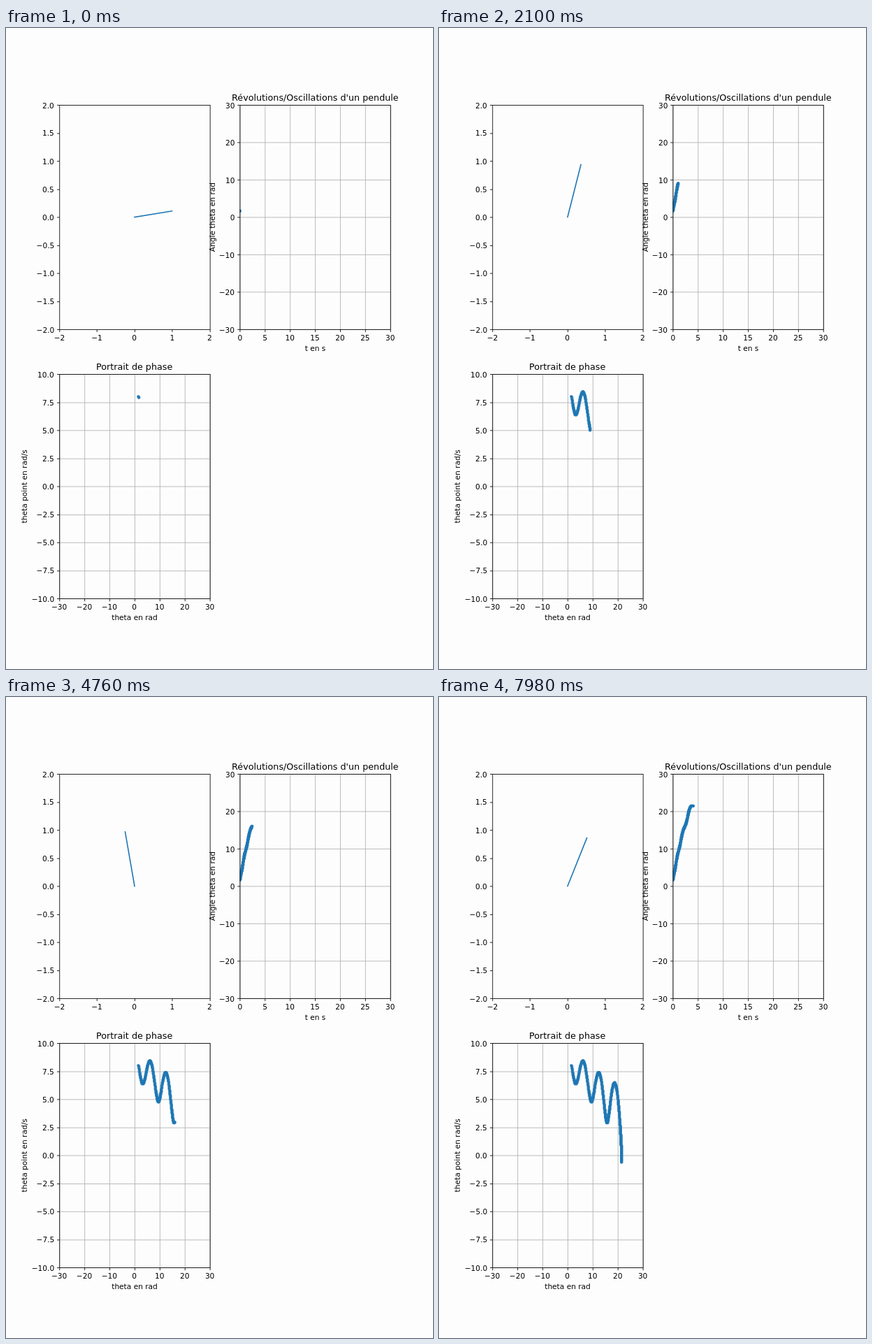
An HTML page with a canvas for the animation above (8 s loop, 611 by 917 pixels).

```html
<!DOCTYPE html>
<html lang="fr">
<head>
<meta charset="utf-8">
<title>Pendule amorti</title>
<style>
html, body { margin: 0; width: 100%; height: 100%; overflow: hidden; background: #fdfdfd; }
canvas { display: block; width: 611px; height: 917px; }
</style>
</head>
<body>
<canvas id="stage" width="611" height="917"></canvas>
<script>
// The figure is laid out on an 800 x 1200 sheet and scaled to the stage
const W = 800, H = 1200;
const LOOP = 8000, STEP = 20, DT = 0.01;
const GRAVITY = 9.81, DAMPING = 0.2;
const BLUE = '#1f77b4', INK = '#000', GRID = '#b0b0b0', PAPER = '#fdfdfd';
const FONT = '"DejaVu Sans", sans-serif';
const PT = 100 / 72;
const SMALL = 10 * PT, LARGE = 12 * PT;
const HAIR = 0.8 * PT, ROD = 1.5 * PT, DOT = 2 * PT;
const TICK = 3.5 * PT, GAP = 7 * PT, LABEL_GAP = 4 * PT, TITLE_GAP = 6 * PT;
const ASCENT = 11, DESCENT = 3;

const canvas = document.getElementById('stage');
const ctx = canvas.getContext('2d');
ctx.scale(canvas.width / W, canvas.height / H);
ctx.imageSmoothingQuality = 'high';

// Dots are stamped on a full-size layer so that overlapping edges build up
const layer = document.createElement('canvas');
layer.width = W;
layer.height = H;
const dots = layer.getContext('2d');

// Subplot geometry: a 2 x 2 grid with a 20 % gutter
const PLOT_W = W * 0.775 / 2.2, PLOT_H = H * 0.77 / 2.2;

function makePlot(col, row, options) {
  return {
    left: W * 0.125 + col * PLOT_W * 1.2,
    top: H * 0.12 + row * PLOT_H * 1.2,
    ...options
  };
}

const swing = makePlot(0, 0, {
  x: { min: -2, max: 2, step: 1, digits: 0 },
  y: { min: -2, max: 2, step: 0.5, digits: 1 }
});
const history = makePlot(1, 0, {
  x: { min: 0, max: 30, step: 5, digits: 0 },
  y: { min: -30, max: 30, step: 10, digits: 0 },
  grid: true,
  title: "Révolutions/Oscillations d'un pendule",
  xLabel: 't en s',
  yLabel: 'Angle theta en rad'
});
const phase = makePlot(0, 1, {
  x: { min: -30, max: 30, step: 10, digits: 0 },
  y: { min: -10, max: 10, step: 2.5, digits: 1 },
  grid: true,
  title: 'Portrait de phase',
  xLabel: 'theta en rad',
  yLabel: 'theta point en rad/s'
});
const plots = [swing, history, phase];

const toX = (p, v) => p.left + (v - p.x.min) / (p.x.max - p.x.min) * PLOT_W;
const toY = (p, v) => p.top + (p.y.max - v) / (p.y.max - p.y.min) * PLOT_H;
const nearest = v => Math.round(v + 1e-6);
const snap = v => nearest(v) + 0.5;

function ticks({ min, max, step }) {
  return Array.from({ length: Math.round((max - min) / step) + 1 }, (_, i) => min + i * step);
}

const format = (v, digits) => v.toFixed(digits).replace('-', '\u2212');

// Damped pendulum, integrated with fourth-order Runge-Kutta
const accel = (a, v) => -GRAVITY * Math.sin(a) - DAMPING * v;

function advance({ t, a, v }) {
  const h = DT / 2;
  const v1 = v, g1 = accel(a, v);
  const v2 = v + h * g1, g2 = accel(a + h * v1, v2);
  const v3 = v + h * g2, g3 = accel(a + h * v2, v3);
  const v4 = v + DT * g3, g4 = accel(a + DT * v3, v4);
  return {
    t: t + DT,
    a: a + DT / 6 * (v1 + 2 * v2 + 2 * v3 + v4),
    v: v + DT / 6 * (g1 + 2 * g2 + 2 * g3 + g4)
  };
}

const states = [{ t: 0, a: 1.6, v: 8 }];
while (states.length <= LOOP / STEP) states.push(advance(states[states.length - 1]));

function line(x1, y1, x2, y2) {
  ctx.beginPath();
  ctx.moveTo(x1, y1);
  ctx.lineTo(x2, y2);
  ctx.stroke();
}

function textWidth(str, size = SMALL) {
  ctx.font = `${size}px ${FONT}`;
  return ctx.measureText(str).width;
}

// anchor: 0.5 centres the text on x, 1 ends it there
function text(str, x, y, anchor, size = SMALL) {
  const width = textWidth(str, size);
  ctx.fillText(str, nearest(x - width * anchor), nearest(y));
}

function drawGrid(p) {
  ctx.strokeStyle = GRID;
  ctx.lineWidth = HAIR;
  for (const v of ticks(p.x)) line(snap(toX(p, v)), p.top, snap(toX(p, v)), p.top + PLOT_H);
  for (const v of ticks(p.y)) line(p.left, snap(toY(p, v)), p.left + PLOT_W, snap(toY(p, v)));
}

function drawAxes(p) {
  const bottom = p.top + PLOT_H;
  const centerX = p.left + PLOT_W / 2, centerY = p.top + PLOT_H / 2;
  const x0 = snap(p.left), y0 = snap(p.top);
  const x1 = snap(p.left + PLOT_W), y1 = snap(bottom);
  ctx.strokeStyle = ctx.fillStyle = INK;
  ctx.lineWidth = HAIR;
  ctx.strokeRect(x0, y0, x1 - x0, y1 - y0);

  const tickBase = bottom + GAP + ASCENT;
  for (const v of ticks(p.x)) {
    const x = toX(p, v);
    line(snap(x), y1, snap(x), y1 + TICK);
    text(format(v, p.x.digits), x, tickBase, 0.5);
  }
  for (const v of ticks(p.y)) {
    const y = toY(p, v);
    line(x0 - TICK, snap(y), x0, snap(y));
    text(format(v, p.y.digits), p.left - GAP, y + ASCENT / 2, 1);
  }

  if (p.title) text(p.title, centerX, p.top - TITLE_GAP, 0.5, LARGE);
  if (p.xLabel) text(p.xLabel, centerX, tickBase + DESCENT + LABEL_GAP + ASCENT, 0.5);
  if (p.yLabel) {
    const widest = textWidth(format(p.y.min, p.y.digits));
    ctx.save();
    ctx.translate(nearest(p.left - GAP - widest - LABEL_GAP - DESCENT), nearest(centerY));
    ctx.rotate(-Math.PI / 2);
    text(p.yLabel, 0, 0, 0.5);
    ctx.restore();
  }
}

function stampDots(p, last, xKey, yKey) {
  dots.save();
  dots.beginPath();
  dots.rect(nearest(p.left), nearest(p.top), nearest(PLOT_W), nearest(PLOT_H));
  dots.clip();
  dots.fillStyle = BLUE;
  for (const s of states.slice(0, last + 1)) {
    dots.beginPath();
    dots.arc(nearest(toX(p, s[xKey])), nearest(toY(p, s[yKey])), DOT, 0, 2 * Math.PI);
    dots.fill();
  }
  dots.restore();
}

function drawRod(angle) {
  ctx.strokeStyle = BLUE;
  ctx.lineWidth = ROD;
  ctx.lineCap = 'square';
  line(toX(swing, 0), toY(swing, 0),
       toX(swing, Math.sin(angle)), toY(swing, -Math.cos(angle)));
  ctx.lineCap = 'butt';
}

function draw(now) {
  const last = Math.floor((now % LOOP) / STEP + 1e-6) % (LOOP / STEP) + 1;
  ctx.fillStyle = PAPER;
  ctx.fillRect(0, 0, W, H);
  plots.filter(p => p.grid).forEach(drawGrid);
  drawRod(states[last].a);

  dots.clearRect(0, 0, W, H);
  stampDots(history, last, 't', 'a');
  stampDots(phase, last, 'a', 'v');
  ctx.drawImage(layer, 0, 0);

  plots.forEach(drawAxes);
}

function tick(now) {
  draw(now);
  requestAnimationFrame(tick);
}

draw(0);
requestAnimationFrame(tick);
</script>
</body>
</html>
```
